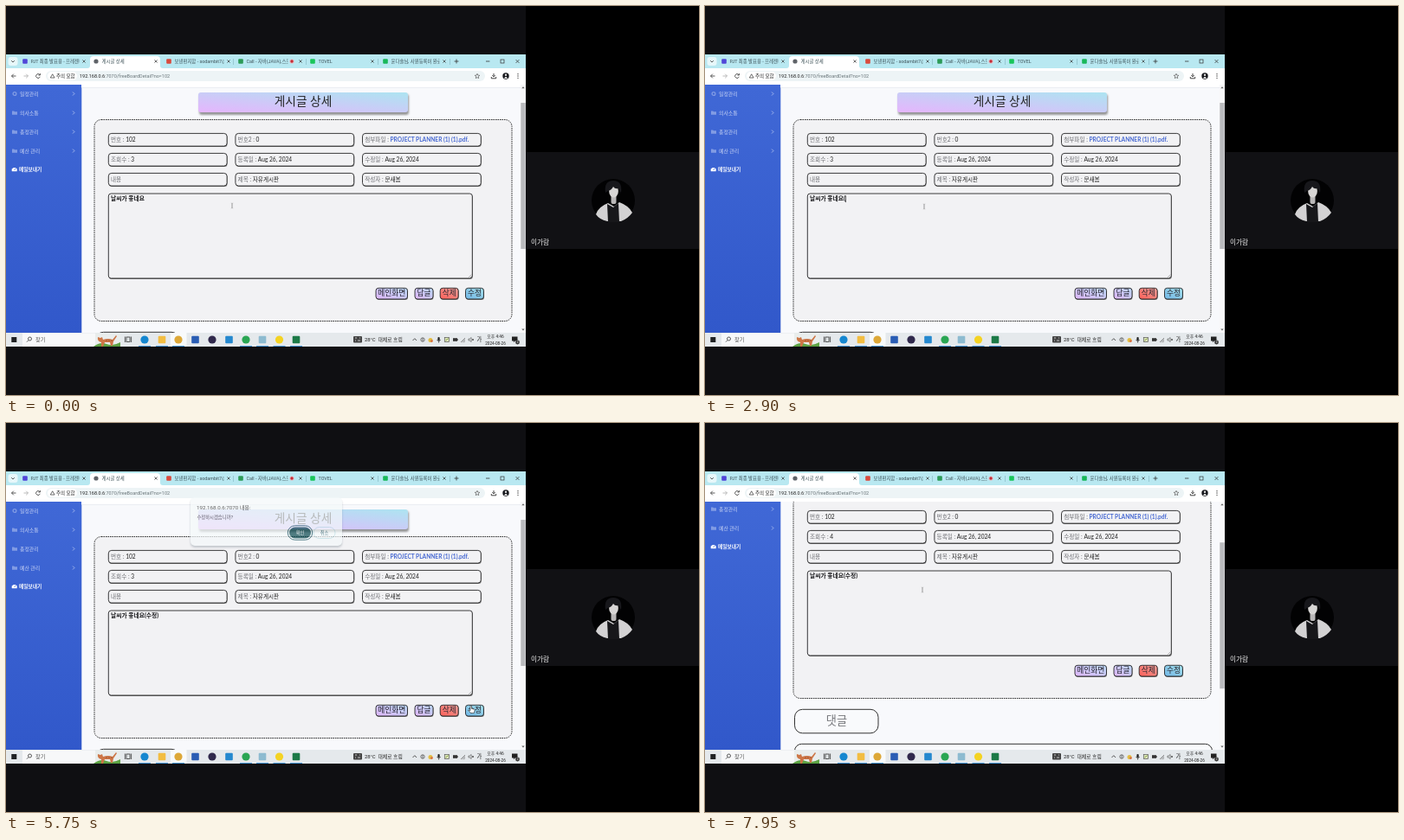
Write an HTML page that moves like this. It is 800 px wide and 450 px high and loops after 8 s.

```html
<!DOCTYPE html>
<html lang="ko">
<head>
<meta charset="utf-8">
<style>
  html, body { margin: 0; width: 100%; height: 100%; overflow: hidden; background: #0f0f12; }
  #stage { display: block; width: 100vw; height: 100vh; font-family: Lato, "Noto Sans CJK KR", sans-serif; }
  .ui { font-family: Roboto, "Noto Sans CJK KR", sans-serif; }
  text { white-space: pre; }
</style>
</head>
<body>
<svg id="stage" viewBox="0 0 800 450"></svg>
<script>
const LOOP = 8000;

// Shape helpers; y of a label is its vertical centre.
const rect = (x, y, w, h, fill, extra = '') =>
  `<rect x="${x}" y="${y}" width="${w}" height="${h}" fill="${fill}" ${extra}/>`;
const disc = (x, y, r, fill, extra = '') => `<circle cx="${x}" cy="${y}" r="${r}" fill="${fill}" ${extra}/>`;
const line = (d, color = '#333', width = 0.8, extra = '') =>
  `<path d="${d}" fill="none" stroke="${color}" stroke-width="${width}" ${extra}/>`;
const label = (x, y, size, str, fill = '#222', extra = '') =>
  `<text x="${x}" y="${y + size * 0.36}" font-size="${size}" fill="${fill}" ${extra}>${str}</text>`;
const clipped = (x, y, w, h, content) =>
  `<svg x="${x}" y="${y}" width="${w}" height="${h}" viewBox="${x} ${y} ${w} ${h}">${content}</svg>`;
const gradient = (id, from, to, coords) =>
  `<linearGradient id="${id}" ${coords}><stop stop-color="${from}"/><stop offset="1" stop-color="${to}"/></linearGradient>`;
const cross = (x, y, r, color) =>
  line(`M${x - r} ${y - r}l${2 * r} ${2 * r}m0 ${-2 * r}l${-2 * r} ${2 * r}`, color, 0.7);
const CENTER = 'text-anchor="middle"', BOLD = 'font-weight="700"';

const diagonal = 'x1="0" y1="1" x2="1" y2="0"', vertical = 'x1="0" y1="0" x2="0" y2="1"';
const defs = `<defs>
  ${gradient('banner', '#e6b5fd', '#ade4f1', diagonal)}
  ${gradient('lilac', '#dfb6fa', '#bad8f3', diagonal)}
  ${gradient('red', '#fb5f58', '#f0a09a', diagonal)}
  ${gradient('blue', '#72b8e8', '#a2dce6', diagonal)}
  ${gradient('side', '#4068d6', '#3158ca', vertical)}
  <filter id="soft" x="-10%" y="-30%" width="120%" height="170%"><feGaussianBlur stdDeviation="1.3"/></filter>
</defs>`;

function tabs() {
  const items = [
    [22, 'PJT 최종 발표용 - 프레젠테', '#5146d8', 90],
    [104, '게시글 상세', '#5f6368', 173],
    [188, '보낸편지함 - sodambit7@', '#d94a3d', 257],
    [271, 'Call - 자바(JAVA),스프', '#2c9b57', 340],
    [354, 'TOVEL', '#19c65a', 423],
    [438, '윤다솔님, 사원등록이 완료', '#19b85a', 506],
  ];
  const drawn = items.map(([x, title, color, close], i) => {
    const room = i === 3 ? 48 : close - x - 12;
    const icon = i === 1 ? disc(x, 64, 2.6, color) : rect(x - 2.8, 61.2, 5.6, 5.6, color, 'rx="1"');
    return icon + clipped(x + 6.5, 58, room, 12, label(x + 6.5, 64.2, 5.4, title, '#3d5157')) + cross(close, 64, 1.6, '#333');
  }).join('');
  const dividers = [262, 346, 429, 512].map(x => rect(x, 61, 0.6, 7, '#83b4c0')).join('');
  return rect(0, 56, 600, 16, '#b8e8f1') +
    rect(2.5, 59, 11, 10, '#e7f7fa', 'rx="3"') + line('M6.2 63.2l1.8 1.8l1.8-1.8') +
    '<path d="M94 72q3 0 3-3v-7q0-4 4-4h73q4 0 4 4v7q0 3 3 3z" fill="#fff"/>' +
    drawn + dividers + disc(330, 64, 2.6, '#e5b9c0') + disc(330, 64, 1.7, '#c52b35') +
    line('M517.5 64h5m-2.5-2.5v5') + line('M554 64h4.4') + rect(571, 62, 4, 4, 'none', 'stroke="#333" stroke-width=".7"') +
    cross(590.5, 64, 2, '#333');
}

function toolbar() {
  return rect(0, 72, 600, 19, '#fff') + rect(46, 75, 507, 12, '#edf4f6', 'rx="6"') +
    line('M11.5 81h-5m2.3-2.3l-2.3 2.3l2.3 2.3') + line('M20.5 81h5m-2.3-2.3l2.3 2.3l-2.3 2.3', '#aaa') +
    line('M38.9 79.5a2.4 2.4 0 1 0 .4 2.3M39.4 78v2h-2') +
    rect(48, 76, 34, 10, '#fff', 'rx="5"') + line('M51.3 83l2.4-4.2l2.4 4.2z', '#333', 0.7) +
    label(58, 81, 5.5, '주의 요함') +
    label(85, 81, 5.5, '192.168.0.6<tspan fill="#697579">:7070/freeBoardDetail?no=102</tspan>') +
    line('M544 78.3l.8 1.8l2 .2l-1.5 1.3l.4 2l-1.7-1l-1.7 1l.4-2l-1.5-1.3l2-.2z', '#444', 0.6) +
    line('M563 78v3.8m-1.7-1.7l1.7 1.7l1.7-1.7M560.3 82v1.8h5.4V82', '#333', 0.9) +
    disc(577, 81, 3.7, '#15161b') + disc(577, 79.8, 1.2, '#ddd') + '<path d="M575 84q2-4.6 4 0z" fill="#ddd"/>' +
    [78.7, 81, 83.3].map(y => disc(591, y, 0.65, '#333')).join('');
}

function sidebar() {
  const items = ['일정관리', '의사소통', '총정관리', '예산 관리'].map((name, i) => {
    const y = 101.5 + 22 * i;
    const icon = i ? '<path d="M7 -2h2.2l.8 .8h3v3.4h-6z" fill="#829ce4" transform="translate(0 ' + y + ')"/>'
      : disc(10, y, 1.9, 'none', 'stroke="#829ce4" stroke-width="1.3"');
    return icon + label(16, y, 5.9, name, '#cad5f4') + line(`M77 ${y - 2}l2 2l-2 2`, '#b9c8f2');
  }).join('');
  return items + '<path d="M6.8 191.2a3.1 3.1 0 1 1 5.8 0z" fill="#fff"/>' + line('M9.7 190l1.2-2', '#3c62d0', 0.7) +
    label(15, 189, 5.7, '메일보내기', '#fff', BOLD);
}

function framed(x, y, w, h, fill, radius = 3.5) {
  return rect(x + 0.5, y + 0.9, w, h, '#777', `rx="${radius}"`) +
    rect(x, y, w, h, fill, `rx="${radius}" stroke="#262628" stroke-width=".9"`);
}

function page() {
  const cells = [
    ['번호', '102'], ['번호2', '0'], ['첨부파일', `<tspan fill="#4668d2" ${BOLD}>PROJECT PLANNER (1) (1).pdf.</tspan>`],
    ['조회수', '<tspan id="views"></tspan>'], ['등록일', 'Aug 26, 2024'], ['수정일', 'Aug 26, 2024'],
    ['내용'], ['제목', '자유게시판'], ['작성자', '문새봄'],
  ].map(([name, value], i) => {
    const x = 118.3 + 146.6 * (i % 3), y = 147.4 + 23 * Math.floor(i / 3);
    const content = value ? `${name} : <tspan fill="#222">${value}</tspan>` : name;
    return framed(x, y, 136.8, 14.7, '#f2f2f4') + label(x + 2.7, y + 7.2, 6.6, content, '#6c6d72');
  }).join('');
  const buttons = [[427, 36.5, '메인화면', 'lilac'], [472, 21, '답글', 'lilac'], [501.2, 21, '삭제', 'red'], [530.5, 21, '수정', 'blue']]
    .map(([x, w, name, fill]) => framed(x, 326.3, w, 12.7, `url(#${fill})`, 3) + label(x + w / 2, 332.2, 8.7, name, '#25232d', CENTER)).join('');
  return rect(87, 60, 507, 34, '#fff') + rect(87, 94, 507, 0.7, '#e6e8ee') +
    rect(223, 102, 242, 24, '#555', 'rx="3" opacity=".6" filter="url(#soft)"') +
    rect(222, 100, 242, 23, 'url(#banner)', 'rx="3"') +
    label(343, 110.5, 13.7, '게시글 상세', '#222', CENTER) +
    rect(102, 131.5, 482, 233, '#f2f2f4', 'rx="8" stroke="#333" stroke-width="1" stroke-dasharray="1.6 .9"') +
    cells + framed(118.3, 217, 420, 98, '#f2f2f4', 3) +
    line('M534 314l3.5-3.5m-1.5 3.5l1.5-1.5', '#777', 0.5) +
    label(121, 223, 6.75, '', '#18181b', `id="body" ${BOLD}`) +
    '<path id="caret" stroke="#111" stroke-width=".8"/><path id="compose" stroke="#222" stroke-width=".7"/>' +
    buttons +
    rect(103.5, 377.3, 96.5, 27.5, '#f9fafc', 'rx="9" stroke="#333" stroke-width="1"') +
    label(152, 390.5, 13.2, '댓글', '#77787c', CENTER) +
    rect(103.5, 417.3, 482, 80, '#f9fafc', 'rx="8" stroke="#333" stroke-width="1"');
}

function taskbar() {
  const apps = [
    [160, '#1687d0', 1], [180, '#f2bd42', 0], [199, '#dda838', 1], [218.5, '#2a5db4', 0], [238, '#30294c', 1],
    [257.5, '#2588cf', 0], [277, '#2aa653', 1], [296, '#8dbbd0', 0], [315.5, '#f4d323', 1], [335, '#1c7a47', 0],
  ].map(([x, color, round]) => round ? disc(x, 386, 4.6, color) : rect(x - 4.3, 381.8, 8.6, 8.4, color, 'rx="1"')).join('');
  const running = [160, 180, 199, 277, 296, 315.5, 335].map(x => rect(x - 7, 393, 14, 1, '#4b9bdb')).join('');
  const cat = rect(103, 378.5, 29, 15.5, '#e9edec') + '<path d="M101 394q8-6 15-3t16-2v5z" fill="#5da344"/>' +
    '<path d="M106 383l3 1l2-1l1 3q6-2 11 0l4-5l1 1l-4 6l-1 5h-2l-1-4h-6l-2 5h-2v-5q-5-1-4-6z" fill="#cd7646"/>' +
    line('M116 386v2m3-2v2m3-2v2', '#884327', 0.6);
  const tray =
    line('M469.5 387l2.3-2.3l2.3 2.3') + disc(481, 386, 2.2, 'none', 'stroke="#555" stroke-width=".8"') + line('M481 384v4', '#555') +
    disc(490, 386.5, 2.5, '#e2bd43') + disc(491.4, 387.6, 1.4, '#d76c42') +
    rect(498.4, 383, 2.3, 4.3, '#222', 'rx="1.1"') + line('M497.6 386q2 3.6 4 0M499.6 388v1.5') +
    rect(506.3, 383.5, 5.3, 5, '#dce6ba', 'stroke="#555" stroke-width=".7"') + line('M507.5 387l3-2.3', '#6b8a24') +
    rect(516, 384.2, 5, 3.6, '#333') + rect(521, 385.3, 0.8, 1.5, '#333') +
    line('M525 389l5-5m-3.4 5l3.4-3.3m-1.6 3.3l1.6-1.4', '#666', 0.7) +
    line('M534 385h1.4l1.7-1.5v5l-1.7-1.5H534z', '#444', 0.6) + cross(539, 386, 1, '#444');
  return rect(0, 378, 600, 16, '#e5e9ec') +
    rect(6.3, 383, 6, 6, '#202224') +
    rect(19, 378.5, 84, 15.5, '#f7f8f9') + disc(27.5, 385, 2, 'none', 'stroke="#333" stroke-width=".8"') + line('M26 386.6l-2 2') +
    label(34, 386, 6.2, '찾기', '#555') + cat +
    rect(139, 383, 4, 5.5, 'none', 'stroke="#333" stroke-width=".8"') + line('M137.4 382.5v6.5m7.2-6.5v6.5') +
    rect(190, 378, 18.5, 16, '#f8fafb') + apps + running +
    rect(401, 382, 10, 7.5, '#444', 'rx="1"') + line('M403 384h2m1 3h3m-6 0h1m4-3h1', '#fff', 0.7) +
    label(414, 386, 5.85, '28°C  대체로 흐림') + tray +
    label(546.5, 386, 6.3, '가', '#222', CENTER) + label(565, 382, 4.9, '오후 4:46', '#222', CENTER) +
    label(565, 390, 4.7, '2024-08-26', '#222', CENTER) +
    '<path d="M584 382.5h6.5v5h-3l-1.5 1.7v-1.7h-2z" fill="#222"/>' + disc(590.5, 389, 2.4, '#333') +
    label(590.5, 389, 3.8, '2', '#fff', CENTER);
}

function participant() {
  return rect(600, 0, 200, 450, '#000') + rect(600, 169, 200, 112, '#111114') + disc(701, 225, 25, '#020203') +
    '<path d="M681 241q3-9 14-13l7 4l6-5q11 4 15 12q-5 7-13 10h-16q-9-2-13-8z" fill="#d3d2d3"/>' +
    '<path d="M694 229l7 4l6-5l1 22h-13z" fill="#17171a"/>' +
    rect(698.5, 217, 6, 12, '#bab8b8', 'rx="2"') +
    '<ellipse cx="701.5" cy="214" rx="5.4" ry="7.6" fill="#d8d6d5"/>' +
    '<path d="M692 216q-2-14 9-14q11 0 9 14l-3-5q-4 1-6-2q-2 4-6 5z" fill="#17171b"/>' +
    label(606, 273.5, 7.6, '이가람', '#eee');
}

function dialog() {
  const pill = (x, fill, name, color, extra) =>
    rect(x, 120.5, 25, 13, fill, `rx="6.5" ${extra}`) + label(x + 12.5, 127, 5.3, name, color, CENTER);
  return '<g id="dialog" class="ui">' + rect(213, 88, 175, 56, '#345', 'rx="5" opacity=".35" filter="url(#soft)"') +
    rect(213, 86, 175, 56, '#f4f9fa', 'rx="5"') +
    label(220, 97.5, 6.2, '192.168.0.6:7070 내용:') + label(220.5, 109, 5.3, '수정하시겠습니까?', '#333') +
    rect(325.3, 118.8, 28.4, 16.4, 'none', 'rx="8.2" stroke="#16505f" stroke-width="1"') +
    pill(327, '#0b4a50', '확인', '#fff', '') +
    pill(355, '#f4f9fa', '취소', '#245a68', 'stroke="#a9d4dd" stroke-width=".7"') + '</g>';
}

const cursors =
  '<g id="cursor">' +
  `<g id="beam">${line('M-1.2 -3q1.2 0 1.2 1v4q0 1 1.2 1M1.2 -3q-1.2 0-1.2 1v4q0 1-1.2 1', '#888', 0.5)}</g>` +
  '<path id="arrow" d="M-1 -3v6.5l1.6-1.4l1.1 2.3l1-.5l-1.1-2.2h2z" fill="#fff" stroke="#444" stroke-width=".5"/>' +
  '<path id="hand" d="M-1 -3.5q1-1 1.6 0v3l2.8 .6q.8 .3 .6 1.5l-.7 3h-3.8l-2.4-3q0-1.2 1.9 0z" fill="#fff" stroke="#222" stroke-width=".6"/></g>';

const stage = document.getElementById('stage');
stage.innerHTML = defs + rect(0, 0, 600, 450, '#0f0f12') +
  `<g class="ui">${tabs()}${toolbar()}</g>` +
  clipped(0, 91, 600, 287,
    rect(87, 91, 513, 287, '#f8f9fc') + rect(0, 91, 87.3, 287, 'url(#side)') +
    `<g id="page">${sidebar()}${page()}</g>` +
    rect(594, 91, 6, 287, '#f7f7f8') + rect(594.3, 112, 5.4, 169, '#b9babd', 'id="thumb"') +
    '<path d="M595.2 95.3l1.8-2l1.8 2zM595.2 373.5l1.8 2l1.8-2z" fill="#666"/>') +
  `<g class="ui">${taskbar()}</g>` + dialog() + participant() + cursors;

const el = id => document.getElementById(id);
const [pageEl, thumb, body, caret, compose, views, dialogEl, cursor] =
  ['page', 'thumb', 'body', 'caret', 'compose', 'views', 'dialog', 'cursor'].map(el);
const clamp = v => Math.min(1, Math.max(0, v));
const smooth = v => { v = clamp(v); return v * v * (3 - 2 * v); };
const show = (node, on) => node.setAttribute('visibility', on ? 'visible' : 'hidden');

const typed = [[0, ''], [1250, '9'], [2000, ''], [2550, '('], [3200, '(ㅅ'], [3350, '(수'], [3550, '(숮'],
  [3700, '(수저'], [3900, '(수정'], [4350, '(수정)']];
const mousePath = [[0, 261, 231], [300, 261, 231], [650, 253, 232], [4500, 253, 232], [5350, 537, 331],
  [5900, 537, 331], [6350, 341, 128], [6750, 341, 128], [7150, 355, 195], [7420, 355, 195], [7850, 251, 193], [LOOP, 251, 193]];

function mouseAt(t) {
  const i = mousePath.findIndex(p => p[0] > t);
  const [t0, x0, y0] = mousePath[i - 1], [t1, x1, y1] = mousePath[i];
  const k = smooth((t - t0) / (t1 - t0));
  return [x0 + (x1 - x0) * k, y0 + (y1 - y0) * k];
}

function draw(now) {
  const t = now % LOOP;
  const scroll = 46 * smooth((t - 7321) / 300);
  pageEl.setAttribute('transform', `translate(0 ${-scroll})`);
  thumb.setAttribute('y', 112 + scroll * 0.57);
  views.textContent = t < 6850 ? 3 : 4;

  const text = '날씨가 좋네요' + typed.filter(k => k[0] <= t).pop()[1];
  if (body.textContent !== text) body.textContent = text;
  const end = 121.6 + body.getComputedTextLength();
  caret.setAttribute('d', `M${end} 219.3v7.8`);
  compose.setAttribute('d', `M${end - 6.5} 227.2h6`);
  show(caret, t >= 650 && t < 5600);
  show(compose, t >= 3200 && t < 4350);

  dialogEl.setAttribute('opacity', clamp((t - 5645) / 150) * (1 - clamp((t - 6600) / 150)));

  const [x, y] = mouseAt(t), pageY = y + scroll;
  const overText = x > 118 && x < 539 && pageY > 217 && pageY < 315;
  const overButton = x > 530 && x < 552 && pageY > 326 && pageY < 339;
  cursor.setAttribute('transform', `translate(${x} ${y})`);
  show(el('beam'), overText);
  show(el('hand'), overButton);
  show(el('arrow'), !overText && !overButton);
  requestAnimationFrame(draw);
}
requestAnimationFrame(draw);
</script>
</body>
</html>
```
